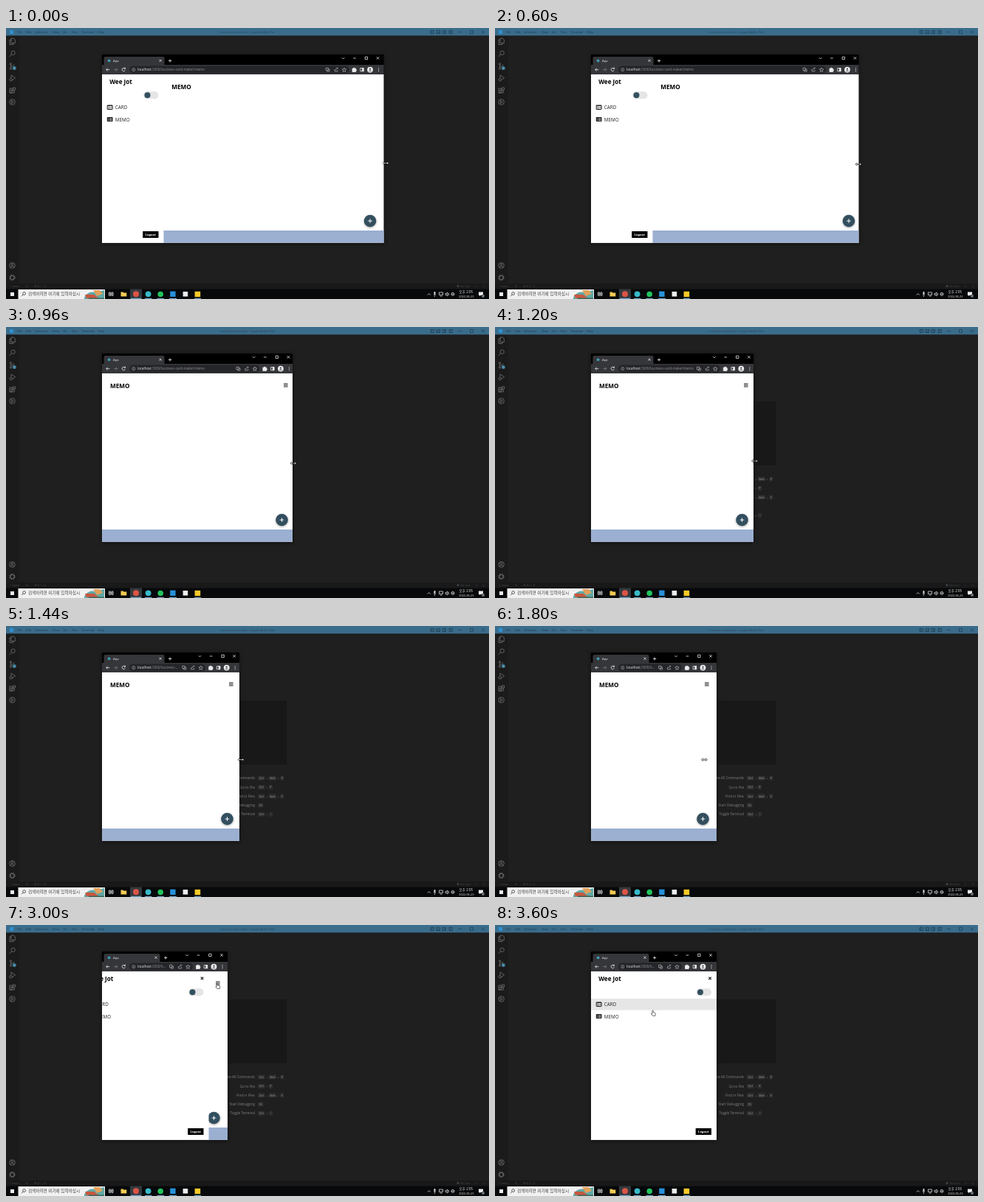
Write an HTML page that moves like this. It is 654 px wide and 368 px high and loops after 3720 ms.

```html
<!DOCTYPE html>
<html lang="ko">
<head>
<meta charset="utf-8">
<title>Responsive memo page</title>
<style>
  html, body { margin: 0; width: 100%; height: 100%; overflow: hidden; background: #1e1e1e; }
  svg { display: block; width: 100vw; height: 100vh; }
  text { font-family: "Open Sans", "Noto Sans", sans-serif; white-space: pre; }
  .ko { font-family: "Noto Sans CJK KR", "Noto Sans CJK", sans-serif; }
  .b { font-weight: 700; }
  .mid { text-anchor: middle; }
  .end { text-anchor: end; }
  .line { fill: none; stroke-width: .8; }
  #win { filter: drop-shadow(0 1px 2.5px rgba(0, 0, 0, .5)); }
  #fab circle { filter: drop-shadow(0 1.5px 1.5px rgba(0, 0, 0, .35)); }
</style>
</head>
<body>
<svg viewBox="0 0 654 368" preserveAspectRatio="none">
  <defs>
    <clipPath id="frame"><rect id="frameBox" x="130" y="36" width="381.5" height="255.8"/></clipPath>
  </defs>

  <!-- editor -->
  <rect width="654" height="368" fill="#1f1f1f"/>
  <rect y="10" width="17.5" height="337" fill="#1b1b1b"/>
  <rect width="654" height="10.3" fill="#3a6c8b"/>
  <rect x="5" y="3" width="5" height="5" fill="#2f8fd0"/>
  <g id="menu" font-size="4.1" fill="#1c3b4f" class="mid"></g>
  <text x="327" y="7" font-size="3.8" fill="#24475c" class="mid">business-card-maker - Copper Atelier Pad</text>
  <g class="line" stroke="#1f4257" stroke-width=".6">
    <path d="M575 3.5h4.5v4h-4.5zM576.8 3.5v4M583 3.5h4.5v4H583zM583 6h4.5M591 3.5h4.5v4H591zM593.8 3.5v4M600 3.5h4.5v4H600zM602 3.5v4M612 5.5h4.5M628.5 3.5h4v4h-4zM644 3.5l4 4m0-4l-4 4"/>
  </g>
  <g class="line" stroke="#747474">
    <path d="M7 14h3.5l1.8 2v4.5H7zM7 16H5v6.5h5v-2"/>
    <circle cx="9.6" cy="33.8" r="2.7"/><path d="M7.6 35.8l-3 3.2"/>
    <circle cx="6.5" cy="49" r="1.2"/><circle cx="6.5" cy="55" r="1.2"/><path d="M6.5 50.2v3.6M11 49.5c0 3-4 2-4.5 3.5"/>
    <path d="M7 68v-4l5.5 3.8L8 71.2"/><circle cx="6.6" cy="70.3" r="1.7"/>
    <path d="M5 82h3.2v6H5zM5 85h6.3v3H5M9.5 81h3v3h-3z"/>
    <circle cx="8.5" cy="100.5" r="3.8"/><path d="M7.3 98.4l3 2.1-3 2.1z"/>
    <circle cx="8.5" cy="322.5" r="3.8"/><circle cx="8.5" cy="321.4" r="1.4"/><path d="M6 325.2c.6-2.3 4.4-2.3 5 0"/>
    <circle cx="8.5" cy="339" r="3.4" stroke-dasharray="1.6 1.05" stroke-width="1.2"/><circle cx="8.5" cy="339" r="2.6"/>
  </g>
  <circle cx="11.3" cy="54.4" r="2.5" fill="#3c7d99"/>
  <text x="11.3" y="55.7" font-size="3.4" fill="#ddd" class="mid">1</text>

  <rect x="293" y="101" width="87" height="87" fill="#181818"/>
  <g id="hints"></g>

  <rect y="347" width="654" height="7.5" fill="#191919"/>
  <g font-size="4" fill="#4c4c4c">
    <text x="5" y="352.4">⑂ main</text><text x="27" y="352.4">↻</text>
    <text x="38" y="352.4">⊗ 0 △ 0</text><text x="610" y="352.4">◉ Go Live</text>
    <text x="635" y="352.4">☺</text><text x="645" y="352.4">♧</text>
  </g>

  <!-- taskbar -->
  <rect y="354.5" width="654" height="13.5" fill="#07090b"/>
  <rect x="6" y="359" width="5" height="5" fill="#eee"/>
  <rect x="16.5" y="355" width="117.5" height="13" fill="#f1f1f1"/>
  <g class="line" stroke="#333"><circle cx="24.6" cy="360.6" r="1.9"/><path d="M23.2 362l-2 2.2"/></g>
  <text x="30" y="363.4" font-size="5.6" fill="#454545" class="ko">검색하려면 여기에 입력하십시</text>
  <path d="M106 366c3-6 9-9 14-7l13-3v12h-27z" fill="#5fa9a6"/>
  <path d="M107 362h12l7 5h-17z" fill="#c9573f"/>
  <path d="M118 356h9l4 5-8 3z" fill="#e3a15c"/>
  <path d="M112 366.5h21v1.5h-21z" fill="#37695a"/>
  <g class="line" stroke="#ddd"><path d="M139.5 359h2.2v4.5h-2.2zM143 359h2v4.5h-2zM139 361.2h6.2"/></g>
  <path d="M155.5 358.5h3l.8 1h4v5h-7.8z" fill="#f3ca55"/>
  <rect x="168" y="354.5" width="16" height="13.5" fill="#34393d"/>
  <circle cx="176" cy="361.3" r="4" fill="#dc5445"/>
  <circle cx="192.6" cy="361.3" r="3.9" fill="#38b9c8"/>
  <circle cx="209.2" cy="361.5" r="3.8" fill="#22c35e"/>
  <rect x="222.2" y="357.6" width="7.4" height="7.4" fill="#2790d9"/>
  <rect x="239.6" y="358" width="6.6" height="6.6" fill="#ededed"/>
  <rect x="255.6" y="357.8" width="7.6" height="7.4" fill="#f5c928"/>
  <path d="M169 367.4h14M188 367.4h9.5M204.5 367.4h9.5M221 367.4h10M255 367.4h9" stroke="#7bb5dc" stroke-width="1"/>
  <g class="line" stroke="#ddd">
    <path d="M570.8 362.6l2-2 2 2M586.5 359h5v3.6h-5zM588 364.2h2.4M595 360.5h1.2l1.6-1.5v5l-1.6-1.5H595zM599 359.8q1.2 1.7 0 3.4"/>
    <circle cx="605" cy="361.4" r="2"/><path d="M603.3 361.4h3.4M580.5 363.5v1.5M579 361.8q1.5 2.5 3 0"/>
  </g>
  <rect x="579.5" y="358" width="2" height="4" rx="1" fill="#ddd"/>
  <text x="622.8" y="360" font-size="4.6" fill="#eee" class="ko mid">오후 2:05</text>
  <text x="623.4" y="366.2" font-size="3.9" fill="#eee" class="mid">2022-06-23</text>
  <path d="M640 358.5h6v4.5h-3.5l-1.2 1.3v-1.3H640z" fill="#eee"/>
  <circle cx="646" cy="364" r="2.3" fill="#4b5156"/><text x="646" y="365.4" font-size="3.4" fill="#fff" class="mid">2</text>

  <!-- browser -->
  <g id="win"><g clip-path="url(#frame)">
    <rect x="130" y="36" width="400" height="256" fill="#000"/>
    <rect id="tab" x="132.5" y="39" height="14" rx="2" fill="#35363a"/>
    <rect x="130" y="50" width="400" height="13" fill="#35363a"/>
    <circle cx="139.6" cy="44.4" r="1.9" fill="#3f9db3"/>
    <text x="145" y="46" font-size="4.2" fill="#e4e5e7">App</text>
    <g id="tabEnd" class="line" stroke="#eee">
      <path d="M-6.5 42.8l3 3m0-3l-3 3"/><path d="M6 44.5h4.2M8.1 42.4v4.2"/>
    </g>
    <rect id="bar" x="167" y="51.6" height="10" rx="5" fill="#242528"/>
    <g class="line" stroke="#e8e8e8">
      <path d="M140.3 56.6h-4.6m2-2l-2 2 2 2"/>
      <path d="M146.2 56.6h4.6m-2-2l2 2-2 2" stroke="#7f8286"/>
      <path d="M161 55a2.2 2.2 0 1 0 .4 2.2M161.5 53.6v1.9h-1.9"/>
      <circle cx="172.8" cy="56.6" r="2.1" stroke="#aaa" stroke-width=".6"/><path d="M172.8 56.3v1.5M172.8 55v.6" stroke="#aaa"/>
    </g>
    <text x="178" y="58.2" font-size="4.5"><tspan fill="#eee">localhost</tspan><tspan id="path" fill="#8e9296"></tspan></text>
    <g id="tools" class="line" stroke="#e8e8e8">
      <path d="M-56.5 40.2l1.7 1.7 1.7-1.7M-41.3 41h3.6M-25.3 39.2h3.4v3.4h-3.4zM-9.7 39.2l3.4 3.4m0-3.4l-3.4 3.4"/>
      <g stroke="#b5b7ba" stroke-width=".7">
        <path d="M-78.4 54.2h3.2v3.5h-3.2zM-76 56h2.6v3h-3.2v-1.3M-66.5 56v2.8h4V57M-65 57c0-2 1-2.4 2.8-2.4m-1.2-1.2l1.2 1.2-1.2 1.2"/>
        <path d="M-53.5 54l.8 1.8 2 .2-1.5 1.3.4 2-1.7-1-1.7 1 .4-2-1.5-1.3 2-.2z"/>
      </g>
      <path d="M-42.5 55h1.5a.9.9 0 0 1 1.8 0h1.4v1.4a.9.9 0 0 1 0 1.8v1.3h-4.7z" fill="#eee"/>
      <path d="M-31.8 54.5h4.4v4.2h-4.4z"/><path d="M-29.2 54.5h1.8v4.2h-1.8z" fill="#eee"/>
      <circle cx="-18.5" cy="56.6" r="3.9" fill="#f0f0f0" stroke="none"/>
      <g fill="#45494d" stroke="none"><circle cx="-18.5" cy="55.6" r="1.2"/><path d="M-20.8 58.8q2.3-2.8 4.6 0z"/></g>
      <path d="M-7 54.2v1M-7 56.1v1M-7 58v1" stroke-width="1"/>
    </g>

    <!-- page -->
    <rect x="130" y="63" width="400" height="229" fill="#fff"/>
    <rect x="130" y="275" width="400" height="17" fill="#9bafd1"/>
    <text id="heading" y="82.8" font-size="8.2" class="b">MEMO</text>
    <g id="fab">
      <path id="burger" d="M-16 77h5.6M-16 79h5.6M-16 81h5.6" stroke="#222" stroke-width="1.1"/>
      <circle cx="-18.5" cy="262" r="8.3" fill="#334f5f"/>
      <path d="M-21.2 262h5.4M-18.5 259.3v5.4" stroke="#fff" stroke-width="1"/>
    </g>
    <g id="panel">
      <rect id="sheet" y="63" height="229" fill="#fff"/>
      <rect id="hover" y="100" height="15.6" fill="#e6e6e6"/>
      <g id="items">
        <text x="10.2" y="76.2" font-size="8.1" class="b">Wee Jot</text>
        <g fill="none" stroke="#1c1c1c">
          <rect x="7.2" y="105.2" width="7" height="5.4" rx=".6"/><path d="M7 105.4h7.2" stroke-width="1.2"/>
          <circle cx="9.4" cy="107.6" r=".5"/><path d="M8.4 109.4h2.2M11.4 107.4h2M11.4 109h2" stroke-width=".7"/>
        </g>
        <rect x="6.8" y="121" width="7.8" height="6" rx=".8" fill="#1c1c1c"/>
        <path d="M8 122.8h1M10 122.8h3.5M8 124.2h1M10 124.2h3.5M8 125.6h1M10 125.6h3.5" stroke="#fff" stroke-width=".6"/>
        <g font-size="6.3" fill="#222"><text x="17.8" y="110.4">CARD</text><text x="17.8" y="126.5">MEMO</text></g>
      </g>
      <path id="shut" d="M-10.7 70.7l3.5 3.5m0-3.5l-3.5 3.5" stroke="#111" stroke-width="1.1"/>
      <rect x="-27.5" y="86.3" width="20.5" height="10" rx="5" fill="#e5e5e7"/>
      <circle cx="-22" cy="91.3" r="4" fill="#34505f"/>
      <rect x="-28.3" y="276" width="21.3" height="9" fill="#000"/>
      <text x="-17.7" y="282" font-size="4.2" fill="#fff" class="b mid">Logout</text>
    </g>
  </g></g>

  <g id="cursor" stroke-linejoin="round">
    <path id="resize" d="M-4.2 0l2.2-1.7v1.1h4v-1.1L4.2 0 2 1.7V.6h-4v1.1z" fill="#fff" stroke="#111" stroke-width=".6"/>
    <path id="arrow" d="M0 0v6.2l1.5-1.3 1 2.2 1-.5-1-2.1h2z" fill="#fff" stroke="#111" stroke-width=".5"/>
    <path id="hand" d="M-.7.6Q0-.4.7.6v2.3l2.5.6q.7.3.6 1.2l-.5 2.8h-3.4L-2.2 4.6q.2-1 1.5.1z" fill="#fff" stroke="#111" stroke-width=".6"/>
  </g>
</svg>

<script>
const STEP = 120, STEPS = 31, LEFT = 130;
const URL_PATH = ':3000/business-card-maker/memo';

// right window edge and how far the page still lags behind it
const DRAG = [
  [511.5, 0], [511.5, 0], [511.5, 0], [511, 0], [507, 2], [492.5, 5], [465, 5], [434, 4.5],
  [388, 4], [370, 3], [350, 3], [332, 3], [316, 2], [303, 1], [300, 0]
];
// step, x, y
const POINTER = [
  [0, 514, 183.5], [3, 513, 184], [5, 492, 185], [7, 434.5, 186], [8, 389, 185], [10, 351.5, 182],
  [12, 318, 181.5], [15, 283.5, 181.5], [16, 283.5, 181.5], [18, 285, 125], [20, 286, 80],
  [21, 286, 79], [27, 286, 79], [28, 284, 82], [29, 255, 104], [30, 213.6, 115.8]
];
// share of the narrow side panel that is visible
const SLIDE = { 6: .72, 7: .078, 24: .35, 25: .85 };

const $ = id => document.getElementById(id);
const set = (id, name, value) => $(id).setAttribute(name, value);
const moveTo = (id, x, y = 0) => set(id, 'transform', `translate(${x} ${y})`);
const show = (id, on) => { $(id).style.display = on ? '' : 'none'; };

function add(parent, tag, attrs, text = '') {
  const el = document.createElementNS('http://www.w3.org/2000/svg', tag);
  for (const name in attrs) el.setAttribute(name, attrs[name]);
  el.textContent = text;
  $(parent).append(el);
}

const MENU = { File: 18, Edit: 31, Selection: 48, View: 67.5, Go: 80, Run: 93, Terminal: 111, Help: 128.5 };
for (const name in MENU) add('menu', 'text', { x: MENU[name], y: 7 }, name);

const HINTS = [
  ['Show All Commands', 'Ctrl', 'Shift', 'P'], ['Go to File', 'Ctrl', 'P'],
  ['Find in Files', 'Ctrl', 'Shift', 'F'], ['Start Debugging', 'F5'], ['Toggle Terminal', 'Ctrl', '`']
];
const KEY_WIDTH = { Ctrl: 9.5, Shift: 9.8, F5: 7.5 };
HINTS.forEach(([label, ...keys], row) => {
  const y = 206.6 + row * 12.3;
  add('hints', 'text', { x: 337, y: y + 1.6, 'font-size': 4.6, fill: '#808080', class: 'end' }, label);
  let x = 341;
  keys.forEach((key, i) => {
    const w = KEY_WIDTH[key] || 5;
    if (i) {
      add('hints', 'text', { x: x + 2.7, y: y + 1.5, 'font-size': 4, fill: '#808080', class: 'mid' }, '+');
      x += 5.5;
    }
    add('hints', 'rect', { x, y: y - 3, width: w, height: 6, rx: 1, fill: '#2f2f2f' });
    add('hints', 'text', { x: x + w / 2, y: y + 1.4, 'font-size': 3.8, fill: '#999', class: 'mid' }, key);
    x += w;
  });
});

function pointerAt(k) {
  const i = POINTER.findIndex(p => p[0] >= k);
  const b = POINTER[i], a = POINTER[Math.max(0, i - 1)];
  const f = b[0] === a[0] ? 0 : (k - a[0]) / (b[0] - a[0]);
  return [a[1] + (b[1] - a[1]) * f, a[2] + (b[2] - a[2]) * f];
}

function fitPath(room) {
  const el = $('path'), line = el.parentNode;
  el.textContent = URL_PATH;
  for (let n = URL_PATH.length - 1; n > 0 && line.getComputedTextLength() > room; n--)
    el.textContent = URL_PATH.slice(0, n) + '...';
}

function draw(k) {
  const [edge, lag] = DRAG[Math.min(k, DRAG.length - 1)];
  const chrome = edge + lag * .6, page = edge + lag;
  const wide = k < 6;

  set('frameBox', 'width', edge - LEFT);
  const tabEnd = Math.min(214.5, chrome - 91.5);
  set('tab', 'width', tabEnd - 132.5);
  moveTo('tabEnd', tabEnd - .5);
  set('bar', 'width', chrome - 47 - 167);
  moveTo('tools', chrome);
  fitPath(chrome - 82 - 178);

  set('heading', 'x', wide ? 224.2 : 141);
  moveTo('fab', page);
  show('burger', !wide);

  const width = wide ? 83.5 : page - LEFT;
  const open = wide ? 1 : SLIDE[k] ?? (k > 25 ? 1 : 0);
  show('panel', open > 0);
  moveTo('panel', LEFT + width * open);
  for (const id of ['sheet', 'hover']) {
    set(id, 'x', -width);
    set(id, 'width', width);
  }
  moveTo('items', -width);
  show('shut', !wide);
  show('hover', k >= 29);

  moveTo('cursor', ...pointerAt(k));
  show('resize', k <= 16);
  show('arrow', k > 16 && k < 20);
  show('hand', k >= 20);
}

const start = performance.now();
let last = -1;
function tick() {
  const k = Math.floor((performance.now() - start) / STEP) % STEPS;
  if (k !== last) draw(last = k);
  requestAnimationFrame(tick);
}
tick();
</script>
</body>
</html>
```
